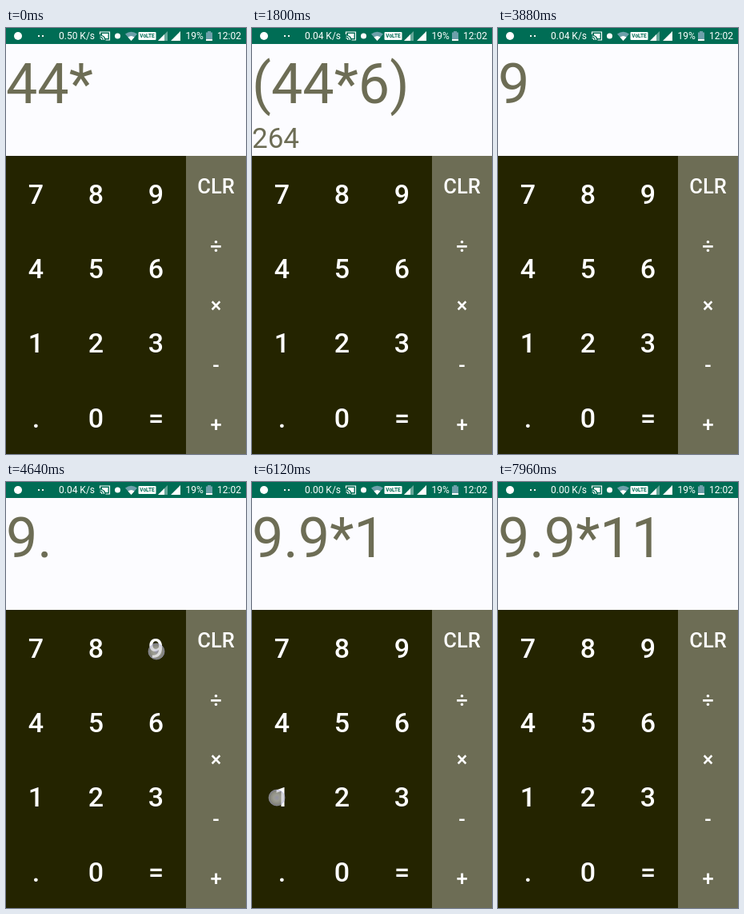
An HTML page for the animation above (8 s loop, 300 px wide and 533 px high).

```html
<!DOCTYPE html>
<html lang="en">
<head>
<meta charset="utf-8">
<title>Calculator</title>
<style>
  html, body { margin: 0; width: 100%; height: 100%; overflow: hidden; }
  svg { display: block; width: 100%; height: 100%; font-family: Roboto, sans-serif; }
  .status { font-size: 12px; fill: #fff; }
  .display { fill: #6d6d55; }
  .keys { fill: #fff; font-weight: 500; text-anchor: middle; }
</style>
</head>
<body>
<svg viewBox="0 0 300 533">
  <defs>
    <radialGradient id="glow">
      <stop offset="0" stop-color="#b8b8dc" stop-opacity=".75"/>
      <stop offset=".4" stop-color="#d0d0d0" stop-opacity=".7"/>
      <stop offset=".8" stop-color="#c0c0c4" stop-opacity=".65"/>
      <stop offset="1" stop-color="#a0a0d0" stop-opacity=".6"/>
    </radialGradient>
  </defs>
  <rect width="300" height="533" fill="#fcfcff"/>
  <rect width="300" height="20" fill="#006d55"/>
  <rect y="160" width="225" height="373" fill="#242400"/>
  <rect x="225" y="160" width="75" height="373" fill="#6d6d55"/>

  <g class="status">
    <circle cx="15" cy="10" r="5"/>
    <path d="M40 9h2v2h-2zM45 9h2v2h-2z"/>
    <text id="speed" x="66" y="14"></text>
    <path d="M117.5 8V5h12v10h-5M117.5 10a5 5 0 0 1 5 5M117.5 12.5a2.5 2.5 0 0 1 2.5 2.5"
          fill="none" stroke="#fff" stroke-width="1.2"/>
    <path d="M120 7h7.5v6h-3q-1-3-4.5-4z"/>
    <circle cx="139.5" cy="10" r="3.5"/>
    <path d="M149 7.5Q156.5 2 164 7.5L156.5 16z" fill="#6da0aa"/>
    <path d="M152.5 11.5Q156.5 8.500 160.5 11.5L156.5 16z"/>
    <rect x="165.5" y="5" width="22" height="10" rx="1"/>
    <text x="176.5" y="12.300" font-size="6.500" font-weight="700" fill="#006d55" text-anchor="middle">VoLTE</text>
    <path d="M190 16L202 4V16z" opacity=".4"/>
    <path d="M190 16L198 8V16zM206 16L218 4V16z"/>
    <text x="224.5" y="14">19%</text>
    <path d="M252 4h4v1.500h2V16h-8V5.500h2z" fill="#6da0aa"/>
    <path d="M250 14h8v2h-8z"/>
    <text x="264" y="14">12:02</text>
  </g>

  <g class="display">
    <text id="entry" y="94" font-size="70"></text>
    <text id="result" y="150" font-size="35"></text>
  </g>
  <g class="keys" id="keys"></g>
  <circle id="touch" r="10" fill="url(#glow)" stroke="#c8c8e0" stroke-opacity=".5"/>
</svg>
<script>
const LOOP = 8000;
const $ = id => document.getElementById(id);

// Each step: start time, value shown from then on.
const entries = [
  [0, "44*"], [560, "44*6"], [1480, "(44*6)"], [3040, ""], [3640, "9"],
  [4200, "9."], [4720, "9.9"], [5400, "9.9*"], [6080, "9.9*1"], [6440, "9.9*11"]
];
const results = [[0, ""], [1480, "264"], [3040, ""]];
const speeds = [[0, "0.50 K/s"], [1720, "0.04 K/s"], [4720, "0.00 K/s"]];

// Each tap: start, end, x, y.
const taps = [
  [440, 600, 187, 304], [1360, 1520, 188, 498], [2880, 3080, 249, 204],
  [3520, 3680, 190, 212], [4080, 4260, 36, 518], [4600, 4760, 188, 212],
  [5280, 5480, 268, 358], [5980, 6160, 31, 395], [6320, 6480, 32, 398]
];

function addKey(label, x, y, size) {
  const key = document.createElementNS("http://www.w3.org/2000/svg", "text");
  key.setAttribute("x", x);
  key.setAttribute("y", Math.round(y));
  key.setAttribute("font-size", size);
  key.textContent = label;
  $("keys").append(key);
}
[..."789456123.0="].forEach((label, i) =>
  addKey(label, 37.5 + 75 * (i % 3), 220 + 93.2 * Math.floor(i / 3), 34));
["CLR", "÷", "×", "-", "+"].forEach((label, i) =>
  addKey(label, 262.5, 207 + 74.6 * i, 25.5));

const valueAt = (steps, t) => steps.findLast(([start]) => t >= start)[1];

function draw() {
  const t = performance.now() % LOOP;
  $("entry").textContent = valueAt(entries, t);
  $("result").textContent = valueAt(results, t);
  $("speed").textContent = valueAt(speeds, t);

  const tap = taps.find(([start, end]) => t >= start && t < end);
  $("touch").style.display = tap ? "" : "none";
  if (tap) $("touch").setAttribute("transform", `translate(${tap[2]} ${tap[3]})`);
  requestAnimationFrame(draw);
}
draw();
</script>
</body>
</html>
```
